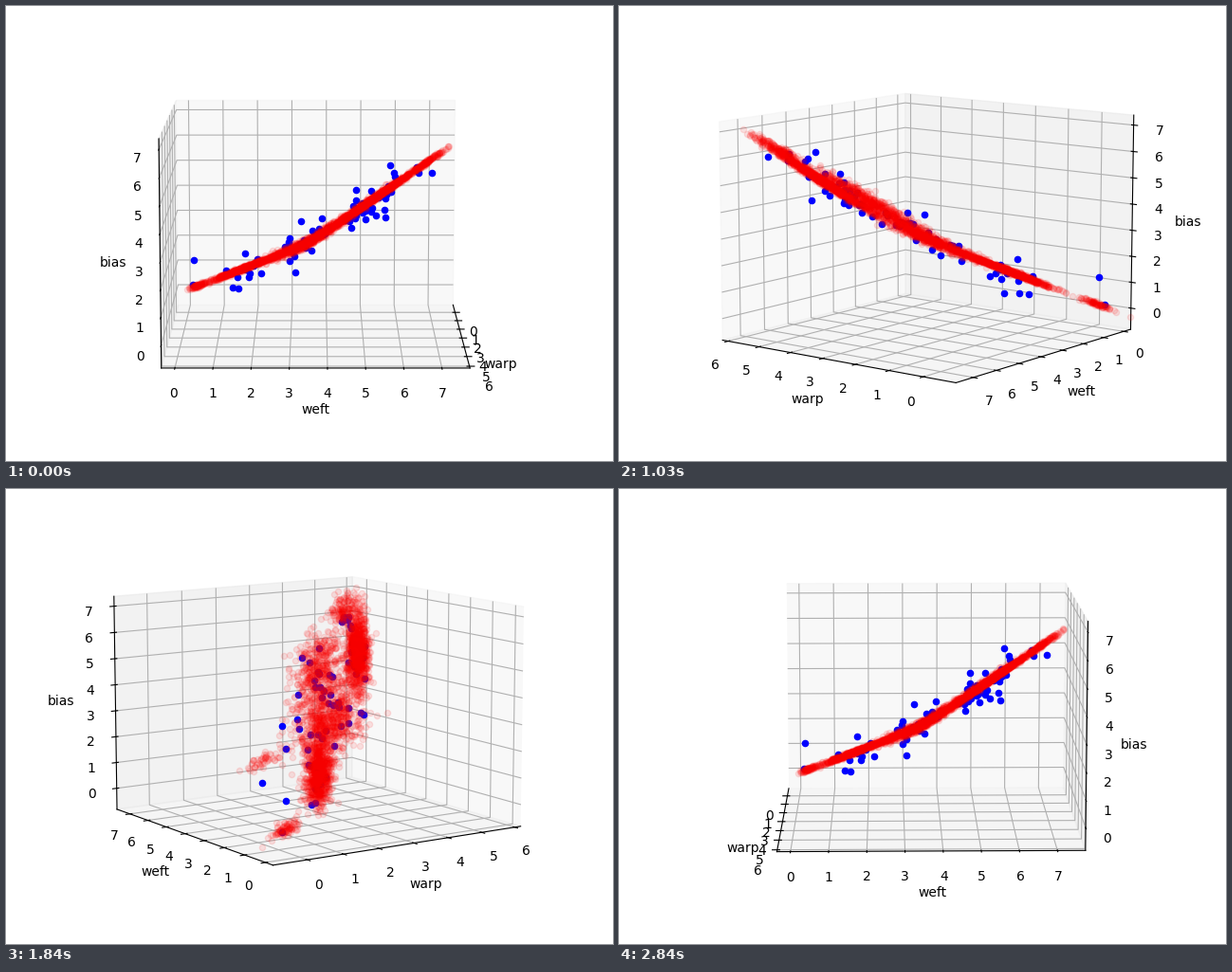
These frames come from a looping animation (640x480 px, 2.94 s). A matplotlib script:

```python
import numpy as np
import matplotlib.pyplot as plt
from matplotlib.animation import FuncAnimation

STEP_MS = 30
LOOP_MS = 2940
ELEV = 10

# Axis limits (warp, weft, bias) and the size of the box in view units
LOW = np.array([-0.932, -0.355, -0.82])
HIGH = np.array([6.183, 7.735, 7.376])
BOX = np.array([1.1905, 1.1905, 0.8929])

# Clusters: position and spread along the sheet, position and spread across it,
# number of model samples, number of observations
CLUSTERS = [
    (0.23, 0.08, 0.175, 0.022, 950, 18),
    (0.43, 0.04, 0.120, 0.030, 150, 3),
    (0.20, 0.08, 0.010, 0.050, 450, 11),
    (-0.03, 0.09, 0.050, 0.070, 750, 21),
    (-0.29, 0.08, 0.010, 0.025, 750, 12),
    (-0.11, 0.02, -0.210, 0.030, 50, 1),
    (-0.51, 0.02, -0.120, 0.030, 90, 2),
]


def sheet(x, y):
    """Height of the bent sheet the data lies on."""
    bend = 0.03 * np.logaddexp(0, (y + 0.03) / 0.03)
    return (-0.052 + 0.39 * y + 0.30 * bend) / 0.985 + 0.177 * x


def scatter_on_sheet(rng, cluster, n, noise):
    """Random points of one cluster in data units, noise measured off the sheet."""
    along, along_sd, across, across_sd = cluster
    y = rng.normal(along, along_sd, n)
    x = 1.206 * rng.normal(across, across_sd, n) + 0.674 * y
    z = sheet(x, y) + rng.normal(0, noise, n)
    unit = np.column_stack([x, y, z]) / BOX + 0.5
    return LOW + unit * (HIGH - LOW)


rng = np.random.default_rng(12)
samples = np.vstack([scatter_on_sheet(rng, c, n, 0.14 * c[3])
                     for *c, n, _ in CLUSTERS])
points = np.vstack([scatter_on_sheet(rng, c, n, 0.042)
                    for *c, _, n in CLUSTERS])

fig = plt.figure(figsize=(6.4, 4.8), dpi=100)
ax = fig.add_axes([0, 0, 1, 1], projection="3d", computed_zorder=False)
observed = ax.scatter(*points.T, color="blue", depthshade=False)
sampled = ax.scatter(*samples.T, color="red", alpha=0.1,
                     depthshade=False, zorder=2)
ax.set(xlim=(LOW[0], HIGH[0]), ylim=(LOW[1], HIGH[1]), zlim=(LOW[2], HIGH[2]),
       xlabel="warp", ylabel="weft", zlabel="bias")


def azimuth(ms):
    """Four degrees per step, with a hold at both ends of the turn."""
    if ms < 100:
        return 0.01
    if ms >= 2840:
        return 359
    return 4 * min(1 + (ms - 100) // STEP_MS, 89)


def update(i):
    azim = azimuth(i * STEP_MS + 20)
    ax.view_init(elev=ELEV, azim=azim)
    # The observations come in front while their side faces the viewer
    observed.set_zorder(3 if 272 < azim < 336 else 1)
    return observed, sampled


anim = FuncAnimation(fig, update, frames=LOOP_MS // STEP_MS,
                     interval=STEP_MS, repeat=True, repeat_delay=0)
plt.show()
```
